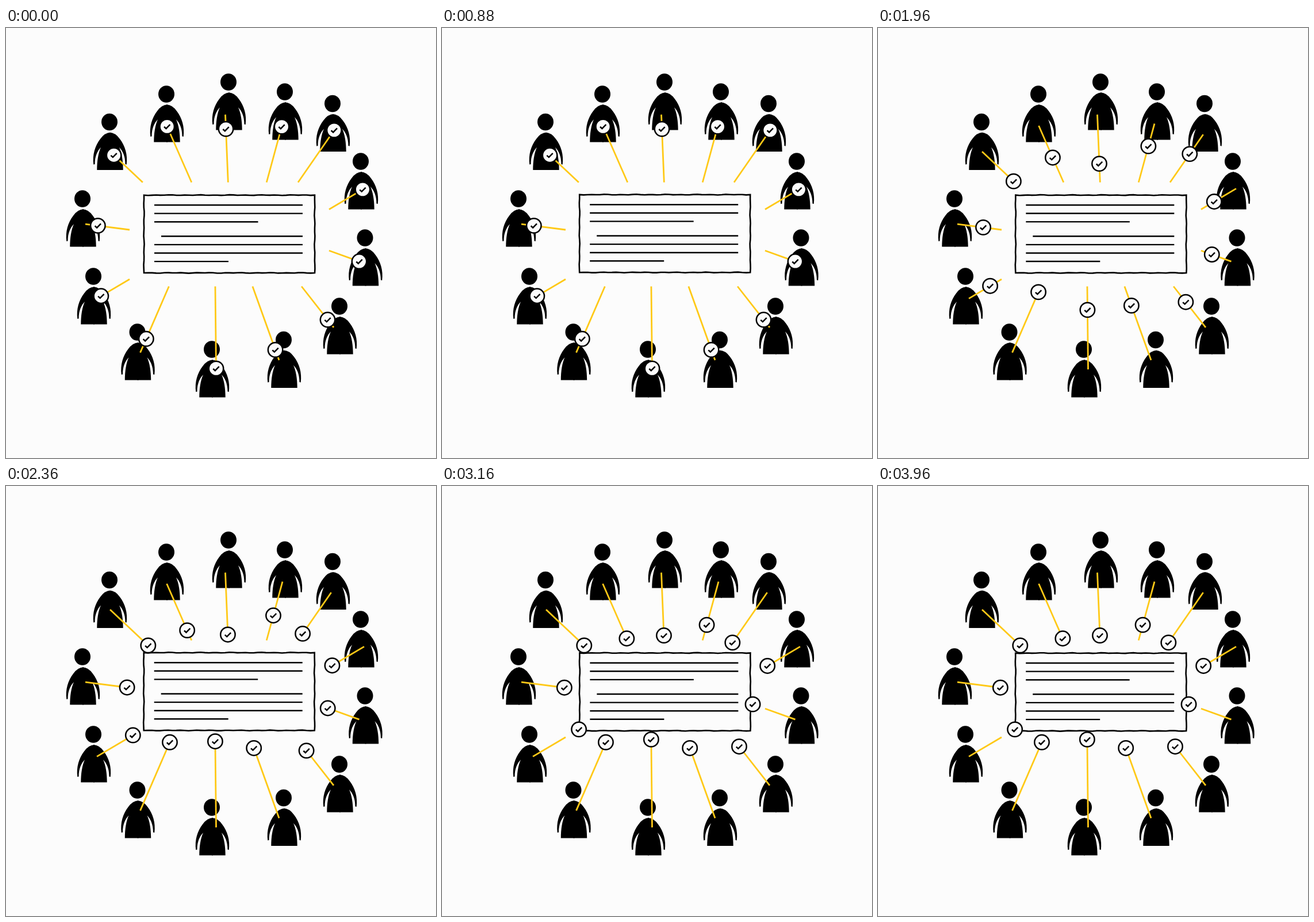
An HTML page with a canvas for the animation above (4000 ms loop, 748 by 748 pixels).

```html
<!DOCTYPE html>
<html lang="en">
<head>
<meta charset="utf-8">
<style>
  html, body { margin: 0; height: 100%; overflow: hidden; background: #fcfcfc; }
  canvas { display: block; }
</style>
</head>
<body>
<canvas id="stage" width="748" height="748"></canvas>
<script>
const ctx = document.getElementById('stage').getContext('2d');
const LOOP = 4000, STEP = 40;
const PAPER = '#fcfcfc', INK = '#000', YELLOW = '#ffc917';
const MIDDLE = 358;                                            // height every lane aims at
const zone = { left: 215, right: 562, top: 268.5, bottom: 449.5 };  // lanes stop here

// head x, y; chest shift; x aimed at; badge travel from, to (px); start, length (steps)
const people = [
  [180, 163.5, 1, 333, 9, 91, 31, 25],
  [279, 115, .6, 362, 1.5, 104, 22, 49],
  [387, 94, -5.5, 390, 25, 109.5, 25, 37],
  [485, 111, -4, 429, 5.5, 78, 24, 51],
  [568, 131.5, -2.3, 446, -9, 106, 33, 35],
  [617, 232, 6, 490, 3, 66, 29, 33],
  [624.5, 365, -10, 480, 0, 78.5, 25, 51],
  [580, 484, -10, 442.5, 17, 86, 25, 44],
  [483, 542.5, -8, 396, 19, 129.5, 31, 27],
  [358, 559, 7.5, 363, 1.5, 153, 28, 34],
  [228.5, 529, 5, 323, 26, 129.5, 33, 21],
  [152, 432, 6, 349, 8.5, 93, 31, 41],
  [133, 297, 5, 269, 22, 75.5, 38, 24],
].map(makePerson);

const head = new Path2D();
head.ellipse(0, 0, 14, 14.7, 0, 0, 7);
const halfBody = new Path2D(
  'M1 83.5H-22.7C-22.7 68-20.5 54-16 44C-21.7 50-26.5 59-26.5 73.5' +
  'L-28.7 74C-31 57-26 41-17 29.5Q-9 18.3 1 18.3Z');
const disc = new Path2D();
disc.arc(0, 0, 12.7, 0, 7);
const check = new Path2D('M-5.2 .4L-1.7 3.6L5.2-3.4');
const border = roughRect(240, 290.7, 537, 426);

function makePerson([x, y, shift, aim, from, to, start, length]) {
  const chest = { x: x + shift, y: y + 25 + 40 * Math.exp(-y / 400) };
  const dx = aim - chest.x, dy = MIDDLE - chest.y, size = Math.hypot(dx, dy);
  const reach = Math.max(
    ((dx > 0 ? zone.left : zone.right) - chest.x) / dx,
    ((dy > 0 ? zone.top : zone.bottom) - chest.y) / dy);
  const along = px => [chest.x + dx * px / size, chest.y + dy * px / size];
  return { x, y, along, reach: reach * size, from, to, start, length };
}

// closed rectangle with slightly uneven, hand-drawn sides
function roughRect(left, top, right, bottom) {
  const path = new Path2D();
  const corners = [[left, top], [right, top], [right, bottom], [left, bottom], [left, top]];
  const wobble = i => .35 * Math.sin(i * 1.7) + .25 * Math.sin(i * .8);
  for (let side = 0; side < 4; side++) {
    const [x1, y1] = corners[side], [x2, y2] = corners[side + 1];
    const count = Math.round(Math.hypot(x2 - x1, y2 - y1) / 7);
    for (let i = 0; i < count; i++) {
      const k = i / count, w = i ? wobble(i + side * 9) : 0;
      path.lineTo(x1 + (x2 - x1) * k + (side % 2) * w,
                  y1 + (y2 - y1) * k + (1 - side % 2) * w);
    }
  }
  path.closePath();
  return path;
}

function at(x, y, draw) {
  ctx.save();
  ctx.translate(x, y);
  draw();
  ctx.restore();
}

function line(x1, y1, x2, y2, color, width) {
  ctx.strokeStyle = color;
  ctx.lineWidth = width;
  ctx.beginPath();
  ctx.moveTo(x1, y1);
  ctx.lineTo(x2, y2);
  ctx.stroke();
}

function drawFigure() {
  ctx.fillStyle = INK;
  ctx.fill(head);
  ctx.translate(1, 0);
  ctx.fill(halfBody);
  ctx.scale(-1, 1);
  ctx.fill(halfBody);
}

function drawBadge() {
  ctx.fillStyle = PAPER;
  ctx.strokeStyle = INK;
  ctx.lineWidth = 2.5;
  ctx.fill(disc);
  ctx.stroke(disc);
  ctx.stroke(check);
}

// two paragraphs: the second is indented, both end in a short row
function drawSheet() {
  ctx.strokeStyle = INK;
  ctx.lineWidth = 2.6;
  ctx.stroke(border);
  const paragraph = (y, count, indent, lastEnd) => {
    for (let i = 0; i < count; i++, y += 14.6)
      line(i ? 258 : 258 + indent, y, i < count - 1 ? 516 : lastEnd, y, INK, 2.4);
  };
  paragraph(308, 3, 0, 438.5);
  paragraph(362.3, 4, 12, 387);
}

const sway = (t, turns) => .42 * (Math.cos(2 * Math.PI * turns * t / LOOP) - 1);

function ease(u) {
  u = Math.min(1, Math.max(0, u));
  return u * u * (3 - 2 * u);
}

function render(t) {
  ctx.fillStyle = PAPER;
  ctx.fillRect(0, 0, 748, 748);
  for (const p of people) {
    at(p.x, p.y, drawFigure);
    line(...p.along(0), ...p.along(p.reach), YELLOW, 2.8);
  }
  at(sway(t, 15.6), sway(t, 16.2), drawSheet);
  for (const p of people) {
    const k = ease((t / STEP - p.start) / p.length);
    at(...p.along(p.from + (p.to - p.from) * k), drawBadge);
  }
}

const begin = performance.now();
function play() {
  const t = (performance.now() - begin) % LOOP;
  render(Math.floor(t / STEP) * STEP);
  requestAnimationFrame(play);
}
play();
</script>
</body>
</html>
```
